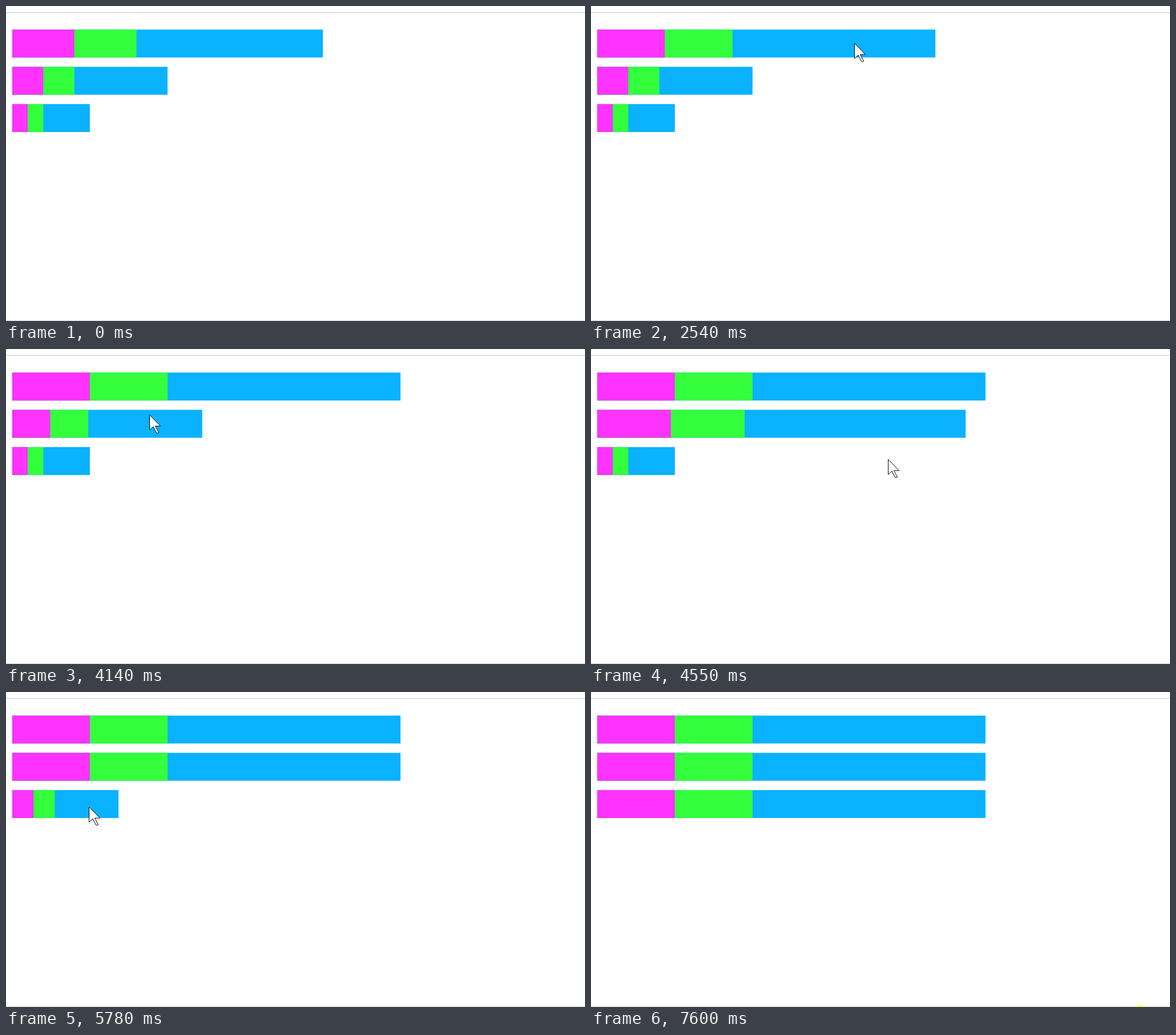
These frames come from a looping animation (1014x552 px, 7.68 s). An HTML page with a canvas:

```html
<!DOCTYPE html>
<html lang="en">
<head>
<meta charset="utf-8">
<title>Growing bars</title>
<style>
  html, body { margin: 0; width: 100%; height: 100%; overflow: hidden; background: #fff; }
  canvas { display: block; }
</style>
</head>
<body>
<canvas id="stage" width="1014" height="552"></canvas>
<script>
const ctx = document.getElementById('stage').getContext('2d');
const LOOP = 7680, GROW = 1054;
const LEFT = 10.88, TOP = 41.3, PITCH = 65.28, HEIGHT = 48.96, FULL = 680;
const growStarts = [2071, 3789, 5481];

// Each glide bends from one resting place to the next; the pointer then waits there.
const glides = [
  { start: 120, end: 250, from: [763, 463], bend: [544, 273], to: [324, 83] },
  { start: 1420, end: 1590, from: [397, 3], bend: [429, 34], to: [461, 65] },
  { start: 2810, end: 3670, from: [461, 65], bend: [397, 272], to: [251, 115] },
  { start: 4150, end: 4640, from: [251, 115], bend: [446, 99], to: [537, 212] },
  { start: 4640, end: 5250, from: [537, 212], bend: [300, 357], to: [145, 201] },
  { start: 5780, end: 6410, from: [145, 201], bend: [890, 344], to: [926, 538] }
];

const arrow = new Path2D('M0 0V26.5L6.5 20.5L12 31.5L13.5 32L16 31L10 19.5H19Z');
const clamp = v => Math.min(1, Math.max(0, v));
const cubic = p => p < 0.5 ? 4 * p ** 3 : 1 - 4 * (1 - p) ** 3;
const smooth = p => p * p * (3 - 2 * p);
const progress = (t, start, end) => clamp((t - start) / (end - start));

function box(color, x, y, w, h) {
  ctx.fillStyle = color;
  ctx.fillRect(x, y, w, h);
}

function drawBar(start, i, t) {
  const initial = 544 / 2 ** i, y = TOP + PITCH * i;
  const w = initial + (FULL - initial) * cubic(progress(t, start, start + GROW));
  box('#0ab2ff', LEFT, y, w, HEIGHT);
  box('#33ff3d', LEFT, y, w * 0.4, HEIGHT);
  box('#ff33ff', LEFT, y, w * 0.2, HEIGHT);
}

function drawPointer(t) {
  const visible = (t >= 120 && t < 320) || (t >= 1420 && t < 6480);
  if (!visible) return;
  const { start, end, from, bend, to } = glides.filter(g => g.start <= t).pop();
  const k = smooth(progress(t, start, end)), r = 1 - k;
  const [x, y] = from.map((a, i) => Math.round(r * r * a + 2 * r * k * bend[i] + k * k * to[i]));
  ctx.save();
  ctx.translate(x + 0.5, y + 0.5);
  ctx.fillStyle = '#fff';
  ctx.strokeStyle = '#000';
  ctx.fill(arrow);
  ctx.stroke(arrow);
  ctx.restore();
}

function draw(t) {
  box('#fff', 0, 0, 1014, 552);
  box('#ccc', 0, 11, 1014, 1);
  box('#ccc', 0, 551, 1014, 1);
  growStarts.forEach((start, i) => drawBar(start, i, t));
  drawPointer(t);
  if (t >= 7600) {
    ctx.fillStyle = '#ffff33';
    ctx.beginPath();
    ctx.arc(961, 561, 12, 0, Math.PI * 2);
    ctx.fill();
  }
}

const origin = performance.now();
function tick() {
  draw((performance.now() - origin) % LOOP);
  requestAnimationFrame(tick);
}
tick();
</script>
</body>
</html>
```
